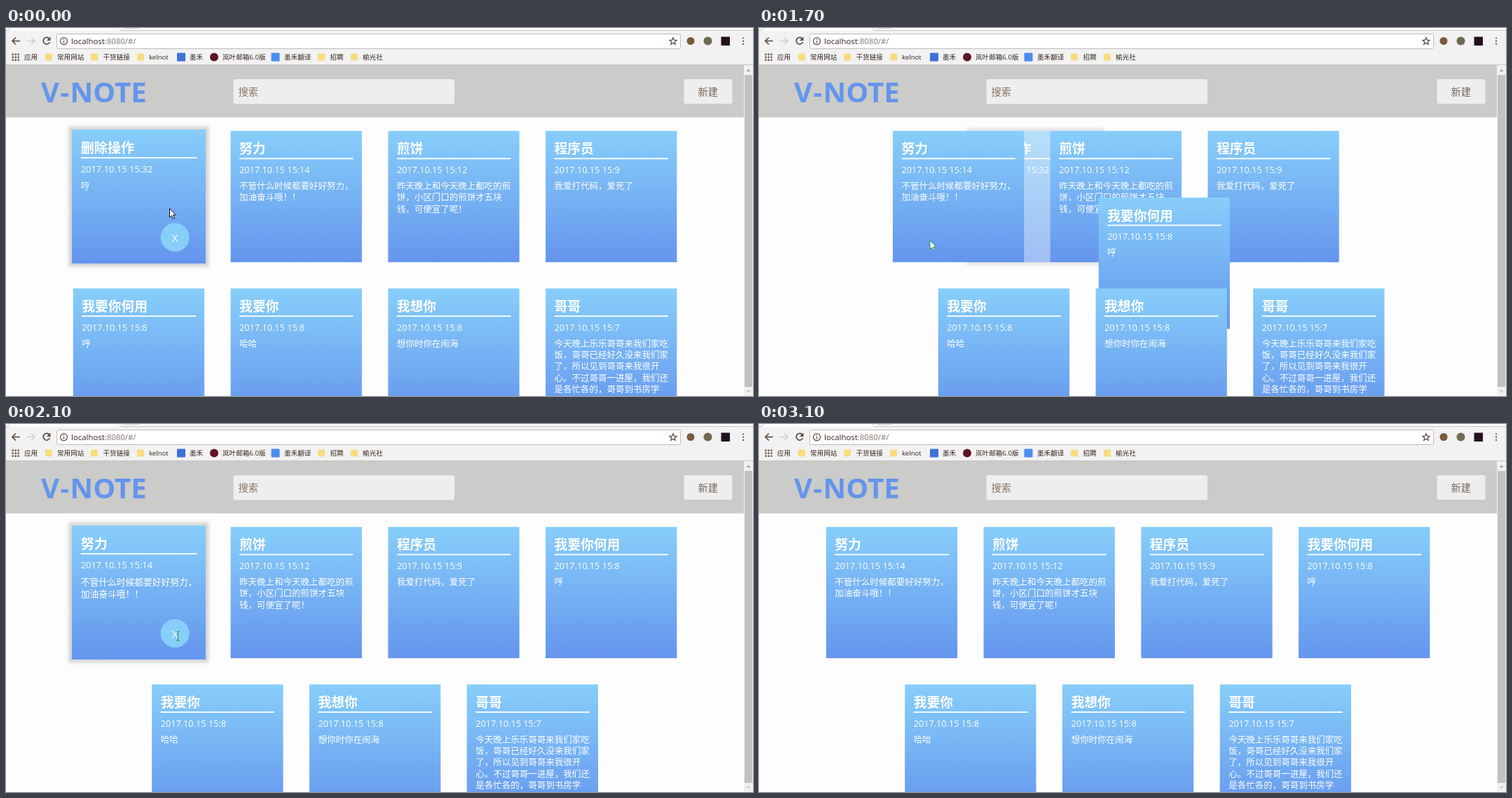
An HTML page for the animation above (3600 ms loop, 1066 by 525 pixels).

```html
<!DOCTYPE html>
<html lang="zh-CN">
<head>
<meta charset="utf-8">
<title>V-NOTE</title>
<style>
html, body { margin: 0; height: 100%; overflow: hidden; background: #fdfdfd; }
svg { display: block; width: 1066px; height: 525px; }
text { font-family: "Open Sans", "Noto Sans CJK SC", "Noto Sans CJK", sans-serif; white-space: pre; }
#notes text { font-weight: 500; }
#notes .title { font-weight: 700; }
</style>
</head>
<body>
<svg id="stage" viewBox="0 0 1066 525">
  <defs>
    <linearGradient id="sky" x2="0" y2="1">
      <stop stop-color="#87cefa"/><stop offset="1" stop-color="#6495ed"/>
    </linearGradient>
    <filter id="blur" x="-20%" y="-20%" width="140%" height="140%"><feGaussianBlur stdDeviation="2"/></filter>
  </defs>
  <g id="notes"></g>

  <!-- browser bars -->
  <path fill="#f2f2f2" d="M0 4H1066V53H0Z"/>
  <path fill="none" stroke="#c4c4c4" d="M0 3.5H4L6 0M162 0L164 3.5H1066M0 52.5H1066"/>
  <path fill="#d2d2d2" d="M167 0H190V1H169Z"/>
  <rect x="72.5" y="8.5" width="890" height="21" rx="2" fill="#fff" stroke="#bcbcbc"/>
  <g fill="none" stroke="#5c4a40" stroke-width="1.7">
    <path d="M20 18.5H9M14 13.5L9 18.5 14 23.5"/>
    <path stroke="#cfcfcf" d="M30 18.5H41M36 13.5L41 18.5 36 23.5"/>
    <path d="M61.8 15.3A4.8 4.8 0 1 0 62.5 20"/>
    <path fill="#5c4a40" stroke="none" d="M63.5 12.5V18H58Z"/>
    <g stroke-width="1.2">
      <circle cx="82.5" cy="18.7" r="5"/>
      <path d="M82.5 18V21.6M82.5 15.6V16.9"/>
      <path d="M952 13.7L953.4 17.2 957 17.4 954.2 19.7 955.2 23.3 952 21.3 948.8 23.3 949.8 19.7 947 17.4 950.6 17.2Z"/>
    </g>
  </g>
  <circle cx="977" cy="18.5" r="5.5" fill="#7b5a3c"/>
  <circle cx="1001.5" cy="18.5" r="6" fill="#6f6a50"/>
  <rect x="1020.5" y="12.5" width="12.5" height="12.5" fill="#24111f"/>
  <path stroke="#5c4a40" stroke-width="2.2" stroke-linecap="round" d="M1052 14.5h.01M1052 18.7h.01M1052 22.9h.01"/>
  <g id="marks"></g>

  <!-- page header -->
  <path fill="#cbcbc9" d="M0 53H1053V127.5H0Z"/>
  <rect x="324.5" y="73" width="315.5" height="35.5" rx="3" fill="#eee"/>
  <rect x="967.5" y="73" width="69" height="35" rx="3" fill="#eee"/>
  <g id="labels"></g>

  <!-- scrollbar -->
  <path fill="#f1f1f1" d="M1053 53H1066V525H1053Z"/>
  <path fill="#c1c1c1" d="M1054 67H1065V512H1054Z"/>
  <path fill="#a3a3a3" d="M1056.5 62L1059.5 58.5 1062.5 62Z"/>
  <path fill="#c8c8c8" d="M1056.5 517L1059.5 520.5 1062.5 517Z"/>

  <g id="pointer">
    <path id="arrow" fill="#fff" d="M.5 .5V13.2L3.3 10.6 5.2 15.2 7.3 14.3 5.4 9.8H9.2Z"/>
    <path id="beam" fill="none" stroke-width="1.1" d="M-2.5 -6.5H-1L0 -5.8 1 -6.5H2.5M0 -6V6M-2.5 6.5H-1L0 5.8 1 6.5H2.5"/>
  </g>
</svg>
<script>
const $ = id => document.getElementById(id);

// One line of text, centred vertically on y
const line = (x, y, size, str, fill, extra = "") =>
  `<text x="${x}" y="${y + size * .38}" font-size="${size}" fill="${fill}" ${extra}>${str}</text>`;

$("labels").innerHTML =
  line(50, 90.3, 40.2, 'V<tspan dx="1">-</tspan><tspan dx="1.5">NOTE</tspan>', "#6495ed", 'font-weight="700"') +
  line(331.5, 90.2, 14.2, "搜索", "#8a7262") +
  line(987.5, 90.7, 14.2, "新建", "#75655a") +
  line(93, 18.6, 11.4, 'localhost<tspan fill="#80756f">:8080/#/</tspan>', "#33241c");

// Bookmarks: icon x, text x, text, icon colour, round icon
const FOLDER = "#f9dc80";
$("marks").innerHTML = line(26, 41.7, 9.6, "应用", "#35261e") + [
  [56, 73, "常用网站", FOLDER], [121, 138.5, "干货链接", FOLDER], [187, 204, "kelnot", FOLDER],
  [244, 262, "墨禾", "#3f70d8"], [291, 309, "岚叶邮箱6.0版", "#5e1523", true],
  [378.5, 397, "墨禾翻译", "#4a8cf0"], [445, 462.5, "招聘", FOLDER], [492, 509, "榆光社", FOLDER]
].map(([ix, tx, str, fill, round]) => {
  const w = fill === FOLDER ? 10 : 12;
  return `<rect x="${ix}" y="${41.5 - w / 2}" width="${w}" height="${w}" rx="${round ? 6 : 1}" fill="${fill}"/>` +
    line(tx, 41.7, 9.6, str, "#35261e");
}).join("") + [0, 1, 2, 3, 4, 5, 6, 7, 8].map(i =>
  `<rect x="${8.5 + i % 3 * 4}" y="${36.5 + (i / 3 | 0) * 4}" width="2.4" height="2.4" fill="#6a5348"/>`).join("");

const notes = [
  ["删除操作", "15:32", "哼"],
  ["努力", "15:14", "不管什么时候都要好好努力，|加油奋斗哦！！"],
  ["煎饼", "15:12", "昨天晚上和今天晚上都吃的煎|饼，小区门口的煎饼才五块|钱，可便宜了呢！"],
  ["程序员", "15:9", "我爱打代码，爱死了"],
  ["我要你何用", "15:8", "哼"],
  ["我要你", "15:8", "哈哈"],
  ["我想你", "15:8", "想你时你在闹海"],
  ["哥哥", "15:7", "今天晚上乐乐哥哥来我们家吃|饭，哥哥已经好久没来我们家|了，所以见到哥哥来我很开|心。不过哥哥一进屋，我们还|是各忙各的，哥哥到书房学"]
];
const SIZE = 187.3, STEP = 224.75, TOP = 146.8;

$("notes").innerHTML = notes.map(([title, time, body]) => `<g>
  <rect class="shadow" x="2" y="2" width="${SIZE - 4}" height="${SIZE - 4}" fill="none" stroke="#d6d6d6" filter="url(#blur)"/>
  <rect width="${SIZE}" height="${SIZE}" fill="url(#sky)"/>
  ${line(12.5, 25.5, 18.75, title, "#fff", 'class="title"')}
  <rect x="12.5" y="38.6" width="162.5" height="1.8" fill="#fff"/>
  ${line(12.5, 55.4, 12.7, "2017.10.15 " + time, "#fff")}
  ${body.split("|").map((s, i) => line(12.5, 78.5 + i * 16.35, 12.5, s, "#fff")).join("")}
  <g class="del"><circle cx="144.3" cy="150.7" r="20" fill="#87cefa"/>
  ${line(144.3, 151, 14.5, "X", "#fff", 'text-anchor="middle"')}</g></g>`).join("");

const cards = [...$("notes").children].map(g =>
  ({ g, shadow: g.querySelector(".shadow"), del: g.querySelector(".del") }));

// Place of card i when n cards wrap in centred rows of four
function slot(i, n) {
  const row = i / 4 | 0, count = Math.min(4, n - row * 4);
  return [545.3 + (i % 4 - count / 2) * STEP, TOP + row * STEP];
}

const mix = (a, b, p) => a.map((v, i) => v + (b[i] - v) * p);

// Linear value of keys [time, ...values] at t
function at(keys, t) {
  const k = keys.findIndex(key => key[0] > t);
  if (k === 0) return keys[0].slice(1);
  if (k < 0) return keys[keys.length - 1].slice(1);
  const a = keys[k - 1], b = keys[k];
  return mix(a, b, (t - a[0]) / (b[0] - a[0])).slice(1);
}

const path = [
  [0, 233, 257], [100, 236, 268], [200, 244, 284], [300, 253, 297], [400, 256, 302], [500, 251, 303],
  [600, 247, 303], [700, 246, 303], [1600, 246, 303], [1700, 243.5, 302.3], [2200, 243.5, 302.3],
  [2300, 506.3, 303], [2400, 752, 322], [2500, 931, 368], [2600, 957, 435], [2700, 968, 504],
  [2800, 971, 494], [2900, 990, 506], [3000, 1007, 515]
];
const hover = [
  [[0, 1]],
  [[1700, 0], [1900, .5], [2100, 1], [2200, 1], [2300, .5], [2400, .15], [2500, 0]],
  [[2200, 0], [2300, .2], [2400, .1], [2500, 0]]
];
const within = (t, a, b) => t >= a && t < b;

function draw(t) {
  const u = Math.min(1, Math.max(0, (t - 1600) / 300));
  const p = 1 - (1 - u) ** 2.12;
  cards.forEach(({ g, shadow, del }, i) => {
    const leaving = i === 0 && u > 0;
    const end = i ? slot(i - 1, 7) : [451.75, TOP];
    const [x, y] = mix(slot(i, 8), end, p);
    const h = hover[i] ? at(hover[i], t)[0] : 0;
    const scale = leaving ? 1 : 1 + .02 * h, mid = SIZE / 2;
    g.setAttribute("transform",
      `translate(${x + mid} ${y + mid}) scale(${scale}) translate(${-mid} ${-mid})`);
    g.setAttribute("opacity", leaving ? Math.max(0, 1 - 1.2 * u) : 1);
    shadow.setAttribute("stroke-width", 4 + 9 * h);
    shadow.setAttribute("opacity", h);
    const active = i === 0 ? t < 1700 : i === 1 ? within(t, 1900, 2300) : i === 2 && within(t, 2300, 2400);
    del.style.display = active ? "" : "none";
  });

  const beam = within(t, 900, 1700) || within(t, 1900, 2300);
  const [x, y] = beam ? [245.5, 302.5] : at(path, t);
  $("pointer").setAttribute("transform", `translate(${x} ${y})`);
  $("pointer").setAttribute("stroke", t < 1700 ? "#111" : "#2f8f57");
  $("pointer").style.display = t < 3100 ? "" : "none";
  $("arrow").style.display = beam ? "none" : "";
  $("beam").style.display = beam ? "" : "none";
}

const start = performance.now();
function tick() {
  draw(Math.floor((performance.now() - start) % 3600 / 100) * 100);
  requestAnimationFrame(tick);
}
tick();
</script>
</body>
</html>
```
